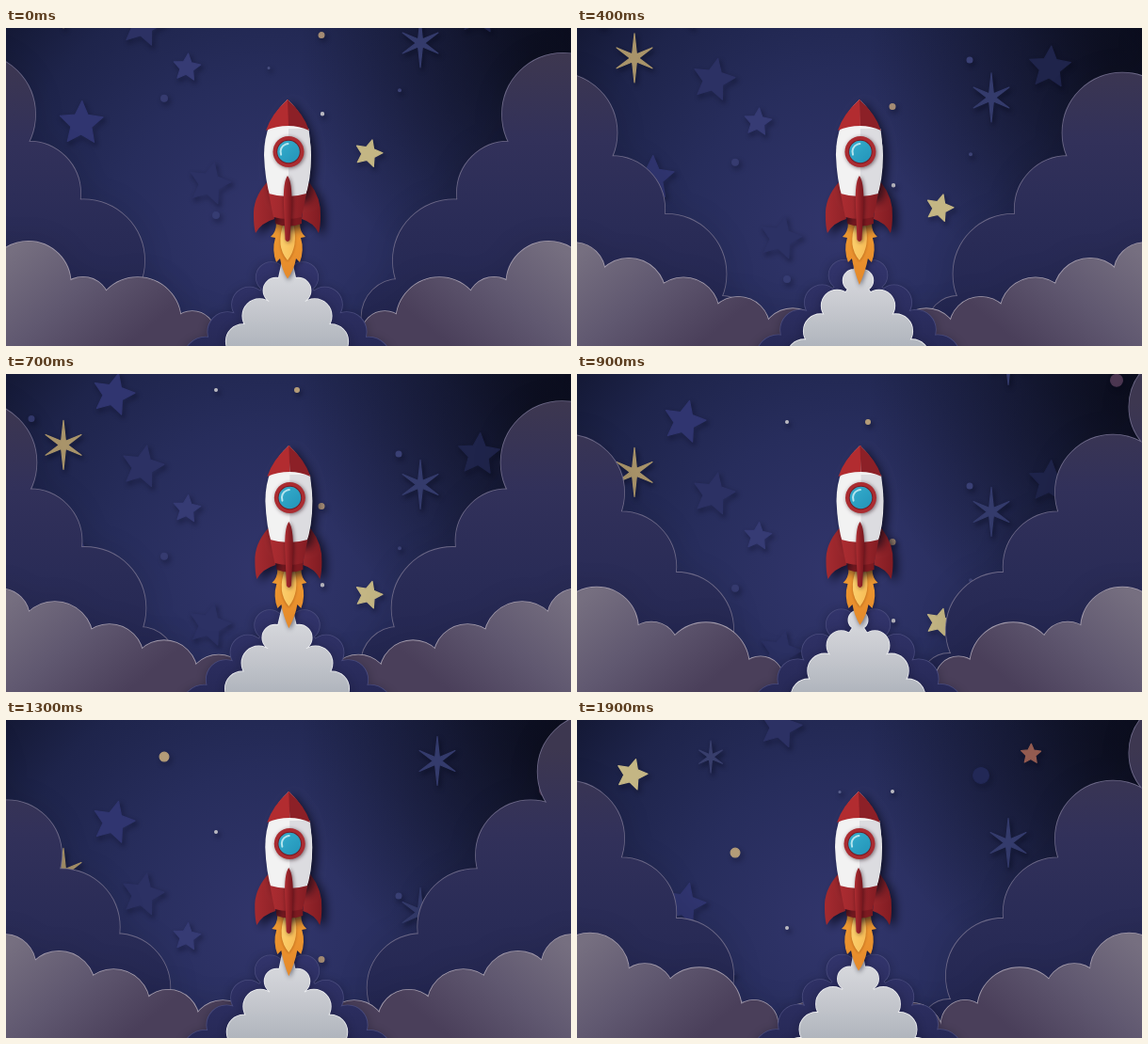
These frames come from a looping animation (600 px wide and 338 px high, 2000 ms). An HTML page with a canvas:

```html
<!DOCTYPE html>
<html lang="en">
<head>
<meta charset="utf-8">
<title>Paper rocket</title>
<style>
  html, body { margin: 0; width: 100%; height: 100%; overflow: hidden; background: #1b2048; }
  canvas { display: block; width: 600px; height: 338px; }
</style>
</head>
<body>
<canvas id="stage" width="600" height="338"></canvas>
<script>
const ctx = document.getElementById('stage').getContext('2d');
const W = 600, H = 338, LOOP = 2000, STEP = 100, TAU = Math.PI * 2;
const PITCH = 58; // horizontal distance between neighbouring cloud puffs

// How many puffs the back and front clouds have passed: [step, back, front].
const travel = [
  [0, .02, .41], [4, 1.24, .95], [6, 1.86, 1.66], [9, 2.41, 2.36],
  [13, 3.62, 2.97], [16, 4.01, 3.6], [19, 4.41, 4.24]
];

const NAVY = '#2c3164', DEEP = '#1f244b', GOLD = '#c4b684', SAND = '#b49c78', PALE = '#b9b8c0';

// Falling layers; every item is [x, step at which it crosses the top edge, radius, colour].
const stars = {
  speed: 14.5,
  items: [
    [145, .2, 23, NAVY], [192, -2.9, 15, '#363b74'], [80, -7, 24, '#303570'],
    [216, -11.4, 23, NAVY], [114, 5.5, 23, '#303570'], [502, 1.1, 23, DEEP],
    [216, 18.5, 23, NAVY], [385, -9.2, 15, GOLD], [58, 15, 17, GOLD], [482, 16.5, 11, '#935b50']
  ]
};
const bursts = {
  speed: 14.5,
  items: [[440, -1.1, 26, '#343b6c'], [61, 1.8, 26, '#a9946a'], [458, 10, 26, '#343b6c'], [142, 16.3, 17, '#383e6c']]
};
const farDots = {
  speed: 17,
  items: [
    [168, -4.4, 4, '#363b70'], [279, -2.5, 1.5, '#4a5080'], [279, 14.5, 1.6, '#59608c'],
    [309, 6, 3, SAND], [223, 6, 2, PALE], [168, 10.7, 5.5, SAND], [418, -3.9, 2, '#3d4375'],
    [417, 2, 3.5, '#3a4075'], [27, 4.2, 3.5, '#343a6e'], [223, -11.7, 4, '#363c72'], [573, 8.6, 7, '#4c3752']
  ]
};
const nearDots = {
  speed: 19,
  items: [[335, -.4, 3.5, '#a58c74'], [336, -4.8, 2.2, PALE], [335, 15, 2, PALE], [429, 15.9, 9, '#222856']]
};

const mix = (a, b, u) => a + (b - a) * u;

function travelled(n, layer) {
  const i = travel.findLastIndex(([at], k) => n >= at && k < travel.length - 1);
  const a = travel[i], b = travel[i + 1];
  return mix(a[layer], b[layer], (n - a[0]) / (b[0] - a[0]));
}

// Puffs slide down the slope of the cloud; p counts puffs from the outer edge.
function backPuff(p) {
  const q = p - 1;
  return [
    PITCH * q - 35 - 30 * Math.max(0, -q),
    90 + 90 * q - 6 * q * q,
    60 + 5 * Math.cos(Math.PI * q) - 35 * Math.max(0, q - 2.6)
  ];
}
function frontPuff(p) {
  const x = PITCH * p;
  return [x, 262 + .42 * x - .0005 * x * x, 37 + 9 * Math.cos(TAU * (x - 32) / 106) - Math.max(0, x - 170) * .15];
}
const whitePuff = n => k => {
  const y = 256 + 27 * (k + (.85 + .15 * n) % 1);
  return [Math.max(0, 2 + .65 * (y - 264)), y, Math.min(18, 10 + .2 * (y - 262))];
};
const navyPuff = n => k => {
  const y = 236 + 29 * (k + 1) + 3 * Math.sin(n);
  return [16 + .8 * (y - 264), y, 16 + 2.5 * k];
};

function gradient(x0, y0, x1, y1, ...colors) {
  const g = ctx.createLinearGradient(x0, y0, x1, y1);
  colors.forEach((c, i) => g.addColorStop(i / (colors.length - 1), c));
  return g;
}

function glow(x, y, r, ...stops) {
  const g = ctx.createRadialGradient(x, y, 10, x, y, r);
  stops.forEach(([at, c]) => g.addColorStop(at, c));
  ctx.fillStyle = g;
  ctx.fillRect(0, 0, W, H);
}

function shadow(color, blur, dx, dy) {
  Object.assign(ctx, { shadowColor: color, shadowBlur: blur, shadowOffsetX: dx, shadowOffsetY: dy });
}
const noShadow = () => shadow('transparent', 0, 0, 0);

function blob(puffs, outline) {
  const path = new Path2D();
  outline.forEach(([x, y]) => path.lineTo(x, y));
  path.closePath();
  for (const [x, y, r] of puffs) {
    path.moveTo(x + r, y);
    path.arc(x, y, r, 0, TAU);
  }
  return path;
}

// A paper layer: soft shadow, light cut edge, then the face.
function paper(path, fill, edge, blur) {
  ctx.strokeStyle = edge;
  ctx.lineWidth = 1.6;
  shadow('rgba(4,6,20,.75)', blur, 0, 2);
  ctx.stroke(path);
  noShadow();
  ctx.fillStyle = fill;
  ctx.fill(path);
}

function cloud(puffAt, passed, inset, fill, edge) {
  const puffs = [-1, 0, 1, 2, 3, 4].map(k => puffAt(k + passed % 1)).filter(([, , r]) => r > 0);
  const last = puffs[puffs.length - 1];
  const path = blob(puffs, [[-200, puffs[0][1]], ...puffs, [last[0], 420], [-200, 420]]);
  paper(path, fill, edge, 24);
  ctx.save();
  ctx.translate(W - inset, 0);
  ctx.scale(-1, 1);
  paper(path, fill, edge, 24);
  ctx.restore();
}

function smoke(puffAt, top, fill, edge) {
  const axis = 298.5;
  const rows = [0, 1, 2, 3].map(puffAt);
  const side = s => rows.map(([d, y, r]) => [axis + s * d, y, r]);
  const right = side(1), left = side(-1);
  const outline = [[axis - 3, top], [axis + 3, top], ...right, ...left.slice().reverse()];
  paper(blob([...right, ...left], outline), fill, edge, 9);
}

function fall({ speed, items }, n, shapeOf) {
  for (const [x, enter, r, color] of items) {
    const path = shapeOf(x, speed * (n - enter), r);
    shadow('rgba(4,6,20,.75)', 5, 2, 3);
    ctx.lineJoin = 'round';
    ctx.lineWidth = 1.2;
    ctx.fillStyle = ctx.strokeStyle = color;
    ctx.stroke(path);
    noShadow();
    ctx.fill(path);
  }
}

function spikes(x, y, points, tilt, radius) {
  const path = new Path2D();
  for (let i = 0; i < points * 2; i++) {
    const a = tilt + Math.PI * (i / points - .5);
    path.lineTo(x + Math.cos(a) * radius(i), y + Math.sin(a) * radius(i));
  }
  path.closePath();
  return path;
}
const star = (x, y, r) => spikes(x, y, 5, .15 + .12 * Math.sin(x), i => i % 2 ? r * .48 : r);
const burst = (x, y, r) => spikes(x, y, 6, 0, i => r * (i % 2 ? .18 : i % 6 ? .84 : 1));
const dot = (x, y, r) => blob([[x, y, r - .6]], []);

function shape(d, fill) {
  ctx.fillStyle = fill;
  ctx.fill(new Path2D(d));
}

function disc(x, y, r, fill) {
  ctx.fillStyle = fill;
  ctx.fill(blob([[x, y, r]], []));
}

function rocket(n) {
  ctx.save();
  ctx.translate(299 + 1.5 * Math.sin(Math.PI * n / 19), 0);

  const tip = 270 - 3.5 * Math.cos(TAU * n / 9.5);
  shadow('rgba(10,8,24,.5)', 5, 1, 2);
  shape(`M-12 207 Q-12 217 -18 222 L-13 223 Q-17 236 -12 249 L-8 245
    Q-6 257 0 ${tip} Q7 257 9 245 L13 249 Q18 236 14 223 L19 222 Q13 217 13 207Z`,
    gradient(0, 208, 0, 270, '#ee9a32', '#e5892a'));
  shadow('rgba(120,50,0,.45)', 3, 0, 1);
  shape('M-4 207 Q-13 232 0 247 Q12 232 6 207Z', gradient(-8, 0, 9, 0, '#fbcf6c', '#f7bb55'));

  shadow('rgba(5,5,20,.7)', 10, 5, 4);
  shape('M-14 192 L15 192 L15 208 Q1 213 -13 208Z', '#7d1a20');
  shape('M-22 164 Q-37 181 -36 200 Q-36 211 -34 218 Q-28 207 -14 203 L-17 175Z',
    gradient(-37, 0, -14, 0, '#a62b30', '#8f2228'));
  shape('M23 164 Q36 181 35 200 Q35 211 33 218 Q28 207 15 203 L18 175Z',
    gradient(15, 0, 36, 0, '#98262b', '#801b22'));
  shape('M0 76 Q-25 99 -25 135 Q-24 162 -18 181 L18 181 Q25 162 25 135 Q25 99 0 76Z', '#f2f2f2');
  noShadow();

  shape('M1 107 L22.5 107 Q28 146 18 181 L1 181Z', '#dcdce0');
  shape('M0 76 Q-17 91 -23 109 Q-12 104 1 104 L1 76Z', '#b22c30');
  shape('M0 76 Q17 91 23 109 Q12 104 1 104Z', '#8c2027');
  shape('M-20 176 Q0 182 20 176 L15 201 Q0 205 -15 201Z',
    gradient(-20, 0, 20, 0, '#ac2c31', '#9c272c', '#841c23'));

  shadow('rgba(30,0,10,.55)', 4, 1, 1);
  shape('M0 157 Q-5 164 -4 188 L-2.5 225 Q0 229 2.5 225 L4.5 188 Q5 164 0 157Z',
    gradient(-4, 0, 4, 0, '#ac2c31', '#78171e'));
  disc(1, 131.5, 16.5, '#ab2c31');
  noShadow();
  disc(1, 131.5, 12.7, '#741b24');
  disc(1, 131.5, 11.8, gradient(-10, 121, 12, 144, '#35aecd', '#2393b8'));
  ctx.beginPath();
  ctx.arc(1, 131.5, 8.5, Math.PI * .88, Math.PI * 1.48);
  ctx.strokeStyle = '#b5e5ee';
  ctx.lineWidth = 2;
  ctx.lineCap = 'round';
  ctx.stroke();
  ctx.restore();
}

function draw(n) {
  glow(280, 215, 390, [0, '#31356b'], [.4, '#272d5c'], [.7, '#1e244b'], [1, '#0f132b']);
  glow(570, 30, 260, [0, 'rgba(8,9,20,.65)'], [1, 'rgba(8,9,20,0)']);
  fall(farDots, n, dot);
  fall(nearDots, n, dot);
  fall(stars, n, star);
  fall(bursts, n, burst);
  cloud(backPuff, travelled(n, 1), 42,
    gradient(0, 30, 0, 300, '#3d3750', '#32315a', '#2a2c57', '#242752'), '#6b6786');
  cloud(frontPuff, travelled(n, 2), 0,
    gradient(20, 225, 120, 345, '#766f80', '#605870', '#4a3f5a'), '#a199aa');
  smoke(navyPuff(n), 250, gradient(0, 250, 0, 338, '#32346b', '#272957'), '#484a7c');
  smoke(whitePuff(n), 240, gradient(0, 250, 0, 338, '#dcdde1', '#c8cad0', '#b0b5bd'), '#ecedf0');
  rocket(n);
}

const start = performance.now();
function tick(now) {
  draw(Math.floor(Math.max(0, now - start) % LOOP / STEP));
  requestAnimationFrame(tick);
}
tick(start);
</script>
</body>
</html>
```
